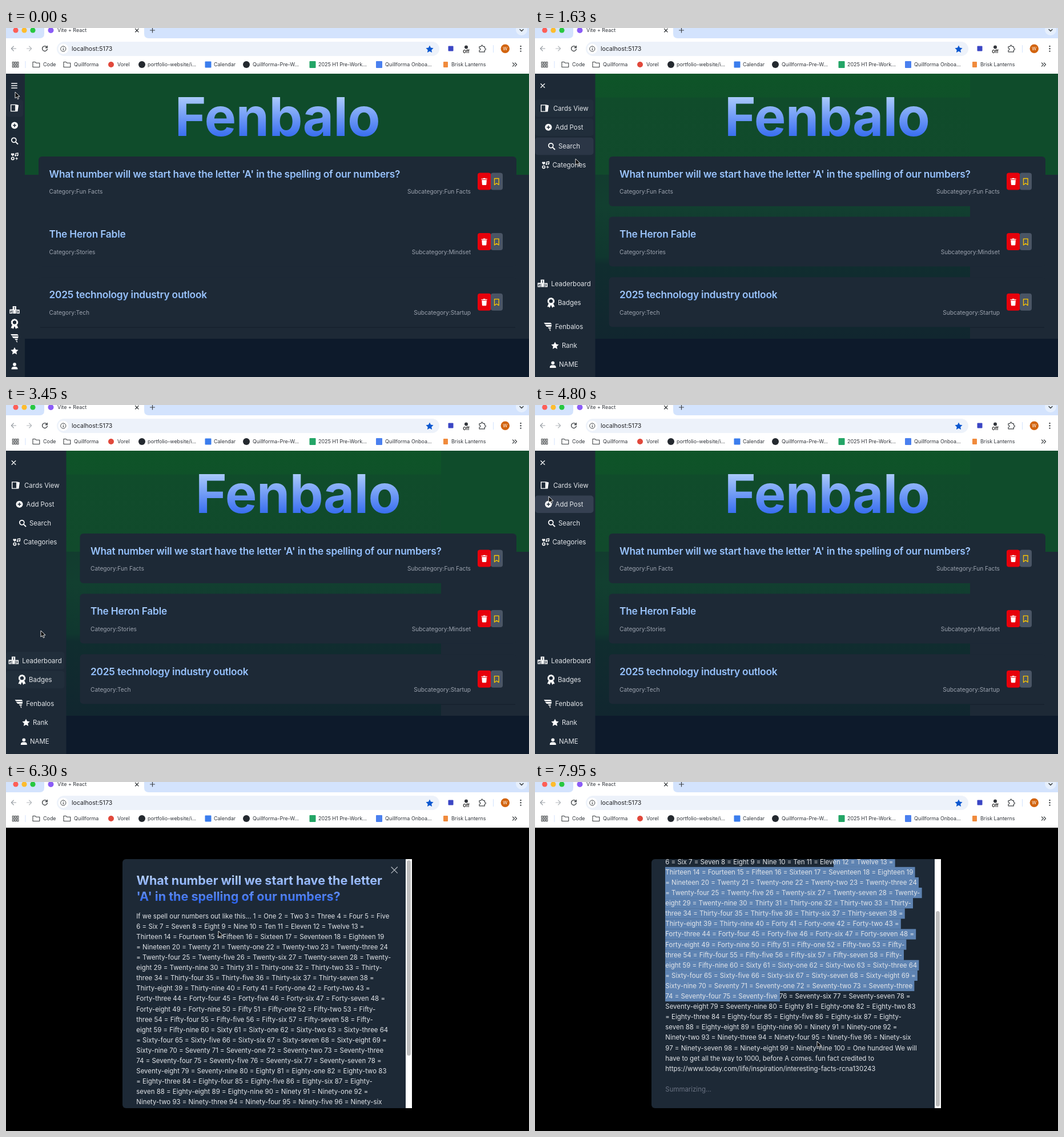
Recreate the animation shown at these times as an HTML page. Size 916x611 px, loop 8000 ms.

```html
<!DOCTYPE html>
<html lang="en">
<head>
<meta charset="utf-8">
<title>Cards view</title>
<style>
html, body { margin: 0; width: 100%; height: 100%; overflow: hidden; background: #000; }
svg { display: block; width: 916px; height: 611px; font-family: Inter, Roboto, "Liberation Sans", sans-serif; }
text { white-space: pre; }
.bar { font-size: 8.95px; fill: #30343a; }
.body { font-size: 11.45px; fill: #e3e6ea; }
.meta { font-size: 10.2px; fill: #9ca3af; }
.head { font-size: 17.3px; font-weight: 600; letter-spacing: -.19px; }
.line { fill: none; stroke: currentColor; }
</style>
</head>
<body>
<svg id="stage" viewBox="0 0 916 611"></svg>
<script>
const LOOP = 8000;
const PANEL = '#1d2936';
const ROW = 18.1;

const modalLines = [
  'If we spell our numbers out like this... 1 = One 2 = Two 3 = Three 4 = Four 5 = Five',
  '6 = Six 7 = Seven 8 = Eight 9 = Nine 10 = Ten 11 = Eleven 12 = Twelve 13 =',
  'Thirteen 14 = Fourteen 15 = Fifteen 16 = Sixteen 17 = Seventeen 18 = Eighteen 19',
  '= Nineteen 20 = Twenty 21 = Twenty-one 22 = Twenty-two 23 = Twenty-three 24',
  '= Twenty-four 25 = Twenty-five 26 = Twenty-six 27 = Twenty-seven 28 = Twenty-',
  'eight 29 = Twenty-nine 30 = Thirty 31 = Thirty-one 32 = Thirty-two 33 = Thirty-',
  'three 34 = Thirty-four 35 = Thirty-five 36 = Thirty-six 37 = Thirty-seven 38 =',
  'Thirty-eight 39 = Thirty-nine 40 = Forty 41 = Forty-one 42 = Forty-two 43 =',
  'Forty-three 44 = Forty-four 45 = Forty-five 46 = Forty-six 47 = Forty-seven 48 =',
  'Forty-eight 49 = Forty-nine 50 = Fifty 51 = Fifty-one 52 = Fifty-two 53 = Fifty-',
  'three 54 = Fifty-four 55 = Fifty-five 56 = Fifty-six 57 = Fifty-seven 58 = Fifty-',
  'eight 59 = Fifty-nine 60 = Sixty 61 = Sixty-one 62 = Sixty-two 63 = Sixty-three 64',
  '= Sixty-four 65 = Sixty-five 66 = Sixty-six 67 = Sixty-seven 68 = Sixty-eight 69 =',
  'Sixty-nine 70 = Seventy 71 = Seventy-one 72 = Seventy-two 73 = Seventy-three',
  '74 = Seventy-four 75 = Seventy-five 76 = Seventy-six 77 = Seventy-seven 78 =',
  'Seventy-eight 79 = Seventy-nine 80 = Eighty 81 = Eighty-one 82 = Eighty-two 83',
  '= Eighty-three 84 = Eighty-four 85 = Eighty-five 86 = Eighty-six 87 = Eighty-',
  'seven 88 = Eighty-eight 89 = Eighty-nine 90 = Ninety 91 = Ninety-one 92 =',
  'Ninety-two 93 = Ninety-three 94 = Ninety-four 95 = Ninety-five 96 = Ninety-six',
  '97 = Ninety-seven 98 = Ninety-eight 99 = Ninety-nine 100 = One hundred We will',
  'have to get all the way to 1000, before A comes. fun fact credited to',
  'https://www.today.com/life/inspiration/interesting-facts-rcna130243'
];

const cards = [
  ["What number will we start have the letter 'A' in the spelling of our numbers?", 'Fun Facts', 'Fun Facts'],
  ['The Heron Fable', 'Stories', 'Mindset'],
  ['2025 technology industry outlook', 'Tech', 'Startup']
];

const icons = {
  cards: '<path class="line" stroke-width="1.4" d="M-6.3-5.6h8v11.2h-8z"/><path d="M2.4-6.3l4.6 1.2-1.6 11-3 .4z"/>',
  plus: `<circle r="6"/><path stroke="${PANEL}" stroke-width="1.6" d="M-3 0h6M0-3v6"/>`,
  search: '<circle class="line" cx="-1.2" cy="-1.2" r="4" stroke-width="1.7"/><path class="line" stroke-width="1.9" d="M1.8 1.8l4.2 4.2"/>',
  categories: '<path d="M-3.3-.6l-2.7-2.6q-.8-2 1-2.6 1-.2 1.7.9.7-1.1 1.7-.9 1.8.6 1 2.6z"/><path class="line" stroke-width="1.3" d="M2-1.4v-4l4-.6v4"/><circle cx="1.5" cy="-1.6" r="1.3"/><circle cx="5" cy="-2" r="1.3"/><circle class="line" cx="-3.2" cy="3.4" r="2.2" stroke-width="1.6"/><path d="M4.6.5L1 4h2.4L2.6 6.6 6.2 3H3.8z"/>',
  podium: `<path d="M-8.7-1.5h5.4V-7h6.2v6H8.7v7H-8.7z"/><path class="line" style="color:${PANEL}" stroke-width="1" d="M-7.2 1h2v1.5h-2v1.6h2.2M-1-4.5l1-.8V-1M4.6 1.2h2v3h-2M5 2.7h1.5M-3.1 0v6M3 0v6"/>`,
  badge: '<circle class="line" cy="-2.6" r="4.8" stroke-width="2.8" stroke-dasharray="2.6 .4"/><circle class="line" cy="-2.6" r="4.3" stroke-width="2"/><path d="M-4.5 2.5l-2 5 2.6-.3 1.4 1.9L0 4l2.5 5.1 1.4-1.9 2.6.3-2-5z"/>',
  funnel: '<path d="M-7-7H5l2 2.6H-5zM-5-3.2H6.8L6 0H-2zM0 1.2h5.8L4.8 3.6H2zM2.2 4.8h2.4L4.8 8z"/>',
  star: '<path d="M0-6.6l2 4.2 4.6.6-3.4 3.2.9 4.6L0 3.8-4.1 6l.9-4.6-3.4-3.2 4.6-.6z"/>',
  user: '<circle cy="-3" r="2.9"/><path d="M-5.5 5.6q0-4.6 4-4.6h3q4 0 4 4.6z"/>'
};

// icon, label, closed y, open icon x, open y, label x
const menu = [
  ['cards', 'Cards View', 140, 17, 140.5, 32],
  ['plus', 'Add Post', 170.5, 23.5, 173.7, 35.5],
  ['search', 'Search', 197.5, 29, 207, 41],
  ['categories', 'Categories', 225, 18.5, 240, 30.5],
  ['podium', 'Leaderboard', 494, 13.3, 447.5, 28.3],
  ['badge', 'Badges', 518, 28, 480.8, 40],
  ['funnel', 'Fenbalos', 543, 22.5, 523, 35.3],
  ['star', 'Rank', 565.5, 35, 556, 47],
  ['user', 'NAME', 592, 31.3, 589.3, 42]
];

// time, x, y of the pointer tip
const path = [
  [0, 16, 112], [300, 14, 100], [750, 16, 104], [1050, 40, 130], [1330, 56, 150],
  [1400, 60, 176], [1450, 64, 193], [1630, 71, 229], [1930, 68, 400], [2250, 56, 507],
  [2400, 54, 515], [2700, 52, 560], [3000, 58, 585], [3150, 62, 504], [3300, 62, 503],
  [3450, 61, 395], [3900, 50, 260], [4350, 30, 178], [4500, 28, 172], [4800, 24, 160],
  [5100, 16, 112], [5400, 13, 97], [5550, 14, 98], [6000, 330, 250], [6300, 372, 261],
  [6450, 385, 260], [6600, 500, 245], [6750, 523, 249], [7350, 429, 488],
  [7500, 458, 473], [7650, 480, 462], [7950, 494, 454]
];

const rect = (x, y, w, h, fill, r = 0, more = '') =>
  `<rect x="${x}" y="${y}" width="${w}" height="${h}" rx="${r}" fill="${fill}" ${more}/>`;
const dot = (x, y, r, fill) => `<circle cx="${x}" cy="${y}" r="${r}" fill="${fill}"/>`;
const text = (x, y, s, cls, more = '') => `<text x="${x}" y="${y}" class="${cls}" ${more}>${s}</text>`;
const stroke = (d, color, w = 1.2) =>
  `<path d="${d}" fill="none" stroke="${color}" stroke-width="${w}" stroke-linecap="round" stroke-linejoin="round"/>`;
const gradient = (id, y1, y2, ...stops) =>
  `<linearGradient id="${id}" gradientUnits="userSpaceOnUse" x1="0" x2="0" y1="${y1}" y2="${y2}">` +
  stops.map(([at, c]) => `<stop offset="${at}" stop-color="${c}"/>`).join('') + '</linearGradient>';

const defs = `<defs>
  ${gradient('bigFill', 108, 198, [0, '#bfdbfe'], [1, '#2b63ee'])}
  ${gradient('headFill', 246, 269, [0, '#b0d2ff'], [1, '#7aaffa'])}
  ${gradient('modalFill', 160, 211, [0, '#c4dcff'], [1, '#2b63ee'])}
  ${gradient('fieldFill', 80, 544, [0, '#0e5428'], [.088, '#0f5229'], [.092, '#104c2b'], [.38, '#114a2c'],
    [.382, '#123c2f'], [.5, '#123f30'], [.69, '#10372f'], [.72, '#102d2f'], [1, '#11262f'])}
  <clipPath id="page"><rect y="80" width="916" height="531"/></clipPath>
  <clipPath id="sheet"><path d="M210 135H700V571H210q-6 0-6-6V141q0-6 6-6z"/></clipPath>
</defs>`;

function chrome() {
  const folder = x => stroke(`M${x - 6} 59.5h4.2l1.6 1.8h6v7.2h-11.8z`, '#3c4043', 1.1);
  const ink = '#3c4043';
  const grid = [0, 1, 2].flatMap(i => [0, 1].map(j =>
    rect(11.3 + i * 4, 59.6 + j * 5.4, 2.6, 3.6, 'none', 0, `stroke="${ink}"`))).join('');
  const marks = [
    [65, 'Code'], [119, 'Quillforma'], [195, 'Vorel'], [248, 'portfolio-website/i...'], [364, 'Calendar'],
    [432, 'Quillforma-Pre-W...'], [547, '2025 H1 Pre-Work...'], [664, 'Quillforma Onboa...'], [780, 'Brisk Lanterns']
  ].map(([x, s]) => text(x, 67.2, s, 'bar')).join('');
  return rect(0, 0, 916, 80, '#fff') +
    '<path fill="#d3e3fd" d="M0 0H67V10q0 8-8 8H0zM242 0H916V18H250q-8 0-8-8z"/>' +
    dot(17, 4, 4.6, '#fe5f57') + dot(32, 4, 4.6, '#febc2e') + dot(47, 4, 4.6, '#28c840') +
    dot(78.5, 4, 5, '#8b5cf6') + text(90, 7.3, 'Vite + React', 'bar') +
    stroke('M226.5 1.5l5.5 5.5m0-5.5l-5.5 5.5M252.5 4h8M256.5 0v8', ink) +
    dot(903, 3, 10, '#e6effd') + stroke('M900 2.5l3 3 3-3', ink, 1.5) +
    stroke('M17.5 36H9.5m3.8-4l-4 4 4 4', '#9aa0a6') + stroke('M36.5 36h8m-3.8-4l4 4-4 4', '#b4b8bd') +
    stroke('M71.5 33.4a4.4 4.4 0 1 0 .8 3.6M72.3 31.5v3h-3', ink, 1.3) +
    rect(89, 24, 670, 25, '#edf2fa', 12.5) + dot(100.3, 36.5, 9, '#fff') +
    `<circle cx="100.3" cy="36.5" r="4.6" fill="none" stroke="${ink}"/>` +
    stroke('M100.3 36v2.6M100.3 34v.1', ink) +
    text(115, 40.3, 'localhost:5173', '', 'font-size="10.6" fill="#202124"') +
    `<g transform="translate(742 37)" fill="#0b57d0">${icons.star}</g>` +
    rect(774.5, 31.5, 9, 9, '#3b46c4', 1) + dot(806, 33.5, 3, '#33363b') +
    text(806, 44, 'Off', '', 'font-size="7.4" font-weight="700" text-anchor="middle" fill="#222"') +
    stroke('M829 32.5h3.2q-.2-2.3 1.5-2.3t1.5 2.3h3.2v3q2 .1 2 1.6t-2 1.6v3.1h-9.4v-2.8q2-.2 2-1.9t-2-1.8z', ink) +
    rect(853, 30, 1, 13, '#d3e3fd') + dot(874.3, 36.3, 7.7, '#d2640f') +
    text(874.3, 39.3, 'W', '', 'font-size="8" text-anchor="middle" fill="#fff"') +
    [32, 36.3, 40.6].map(y => dot(901.5, y, 1.2, ink)).join('') +
    grid + rect(33.5, 58, 1, 12, '#d3e3fd') + folder(53) + folder(107) +
    dot(184, 64, 5, '#e1483b') + dot(238, 64, 6, '#24292f') + rect(348.5, 58.5, 11, 11, '#3b7ded', 1) +
    dot(421, 64, 6, '#24292f') + rect(531.5, 58, 11, 12, '#23a566', 1) + rect(648, 58, 11, 12, '#4a80ef', 1) +
    rect(766, 59, 8, 10, '#f08a3c', 1) + marks +
    stroke('M887.5 61l3 3-3 3m4-6l3 3-3 3', ink);
}

function card([title, cat, sub], i) {
  return `<g transform="translate(0 ${i * 105.6})">
    ${rect(57, 225, 837, 87, PANEL, 6, 'class="card"')}
    <g class="shift">${text(75.5, 261.7, title, 'head', 'fill="url(#headFill)"')}${text(75.5, 290.4, 'Category:' + cat, 'meta')}</g>
    ${text(814, 290.4, 'Subcategory:' + sub, 'meta', 'text-anchor="end"')}
    ${rect(826, 253.5, 23.5, 30, '#e7000b', 4)}${rect(849, 253.5, 21, 30, '#4a5565', 4)}
    <path fill="#fff" d="M832.5 263.8h3l.6-1h3l.6 1h3v1.3h-10.2zM833.3 266h8.6l-.6 8q-.1 1-1 1h-5.4q-.9 0-1-1z"/>
    ${stroke('M855.5 263.5h7.6v11l-3.8-2.8-3.8 2.8z', '#fdc700', 1.3)}
  </g>`;
}

function entry([icon, label, , , y, x]) {
  return `<g>${rect(0, y - 15.3, 102.5, 30.6, '#354051', 5, 'class="hover"')}
    <g class="icon" fill="#fff" color="#fff">${icons[icon]}</g>
    ${text(x, y + 4.1, label, 'body label')}</g>`;
}

function modal() {
  const big = 'font-size="21.6" font-weight="700" letter-spacing="-.03" fill="url(#modalFill)"';
  return `<g id="modal">${rect(0, 80, 916, 531, '#000')}
    ${rect(204, 135, 20, 436, PANEL, 6)}${rect(210, 135, 490, 436, PANEL)}
    <g clip-path="url(#sheet)"><g id="scroll">
      ${modalLines.map((_, i) => rect(228, 225.6 + i * ROW, 0, ROW + .1, '#5e83b2', 0, 'class="mark"')).join('')}
      ${stroke('M675 149l10.4 10.4m0-10.4l-10.4 10.4', '#b4b9c0')}
      ${text(228.5, 180.3, 'What number will we start have the letter', '', big)}
      ${text(228.5, 207.5, "'A' in the spelling of our numbers?", '', big)}
      ${modalLines.map((s, i) => text(228.3, 238.6 + i * ROW, s, 'body row')).join('')}
      ${text(228.3, 655, 'Summarizing...', 'body', 'style="fill:#6a7282"')}
    </g></g>
    ${rect(700, 135, 11, 436, '#fff')}${rect(702, 137, 7, 342, '#bfbfbf', 3.5, 'id="thumb"')}
  </g>`;
}

const stage = document.getElementById('stage');
stage.innerHTML = defs + `<g clip-path="url(#page)">
  ${rect(0, 80, 916, 531, '#0d1a2b')}
  ${rect(33, 80, 883, 177, '#0f4c2b')}${rect(33, 257, 883, 287, PANEL)}
  ${rect(60, 523.5, 832, 1.3, '#15202c')}
  ${rect(33, 80, 729, 464, 'url(#fieldFill)', 0, 'id="field"')}
  <text id="banner" y="189" text-anchor="middle" font-size="93.5" font-weight="700" letter-spacing="-.5" fill="url(#bigFill)">Fenbalo</text>
  ${cards.map(card).join('')}
  ${rect(0, 80, 33, 531, PANEL, 0, 'id="side"')}
  <g id="burger">${stroke('M9.7 97h9.6M9.7 101h9.6M9.7 105h9.6', '#fff', 1.4)}</g>
  <g id="close">${stroke('M10.2 97.7l6.6 6.6m0-6.6l-6.6 6.6', '#fff', 1.3)}</g>
  ${menu.map(entry).join('')}
  ${modal()}
</g>${chrome()}
<path id="pointer" d="M0 0v11l2.6-2.4 1.9 4 1.8-.8-1.8-3.9h3.6z" fill="#000" stroke="#fff" stroke-width=".9"/>`;

const $ = id => document.getElementById(id);
const all = cls => [...stage.querySelectorAll('.' + cls)];
const set = (el, attrs) => { for (const k in attrs) el.setAttribute(k, attrs[k]); };
const mix = (a, b, p) => a + (b - a) * p;
const ramp = (t, a, b) => Math.min(1, Math.max(0, (t - a) / (b - a)));

const parts = { cards: all('card'), shifts: all('shift'), hovers: all('hover'), icons: all('icon'), labels: all('label'), marks: all('mark') };
const widths = all('row').map(el => el.getComputedTextLength());

function hold(t) {
  const base = t < 1190 ? 0 : t < 1330 ? 1190 : t < 2250 ? 1330 : 2250;
  return base + Math.floor((t - base) / 150) * 150;
}

function pointerAt(t) {
  const i = path.findIndex(k => k[0] > t);
  if (i < 0) return path[path.length - 1].slice(1);
  if (i === 0) return path[0].slice(1);
  const [a, b] = [path[i - 1], path[i]];
  const p = ramp(t, a[0], b[0]);
  return [mix(a[1], b[1], p), mix(a[2], b[2], p)];
}

// Hover tint trails the pointer.
function hoverAt(t, y) {
  let sum = 0;
  for (let lag = 60; lag <= 300; lag += 60) {
    const [px, py] = pointerAt(t - lag);
    if (px < 103 && Math.abs(py - y) < 15.3) sum += .2;
  }
  return sum;
}

function drawSide(t) {
  const open = ramp(t, 600, 900) - ramp(t, 5400, 5700);
  const dx = 72.5 * open;
  set($('side'), { width: mix(33, 105.5, open) });
  set($('field'), { opacity: open });
  set($('burger'), { opacity: 1 - open });
  set($('close'), { opacity: open });
  set($('banner'), { x: 475.5 + dx / 2 });
  parts.cards.forEach(el => set(el, { x: 57 + dx, width: 837 - dx }));
  parts.shifts.forEach(el => set(el, { transform: `translate(${dx} 0)` }));
  menu.forEach(([, , y0, x1, y1], i) => {
    set(parts.icons[i], { transform: `translate(${mix(15, x1, open)} ${mix(y0, y1, open)})` });
    set(parts.labels[i], { opacity: open });
    const rest = i === 0 ? .2 * (1 - open) : 0;
    set(parts.hovers[i], { opacity: Math.max(rest, hoverAt(t, y1) * open), width: mix(30, 102.5, open) });
  });
}

function drawModal(t) {
  const shown = ramp(t, 5850, 6150);
  set($('modal'), { opacity: shown, visibility: shown ? 'visible' : 'hidden' });
  const [x, y] = pointerAt(Math.min(t, 7350));
  const last = t < 6750 ? -1 : Math.floor((y - 225.6) / ROW);
  parts.marks.forEach((el, i) => {
    const from = i === 1 ? 523 : 228;
    const to = i < last ? 231.5 + widths[i] : x;
    set(el, { x: from, width: i > 0 && i <= last ? Math.max(0, to - from) : 0 });
  });
  const p = ramp(t, 7500, 7950);
  set($('scroll'), { transform: `translate(0 ${-113 * p})` });
  set($('thumb'), { y: 137 + 89 * p });
}

function draw(time) {
  const t = hold(time % LOOP);
  drawSide(t);
  drawModal(t);
  set($('pointer'), { transform: `translate(${pointerAt(t).join(' ')})` });
}

const start = performance.now();
function tick(now) {
  draw(Math.max(0, now - start));
  requestAnimationFrame(tick);
}
draw(0);
requestAnimationFrame(tick);
</script>
</body>
</html>
```
